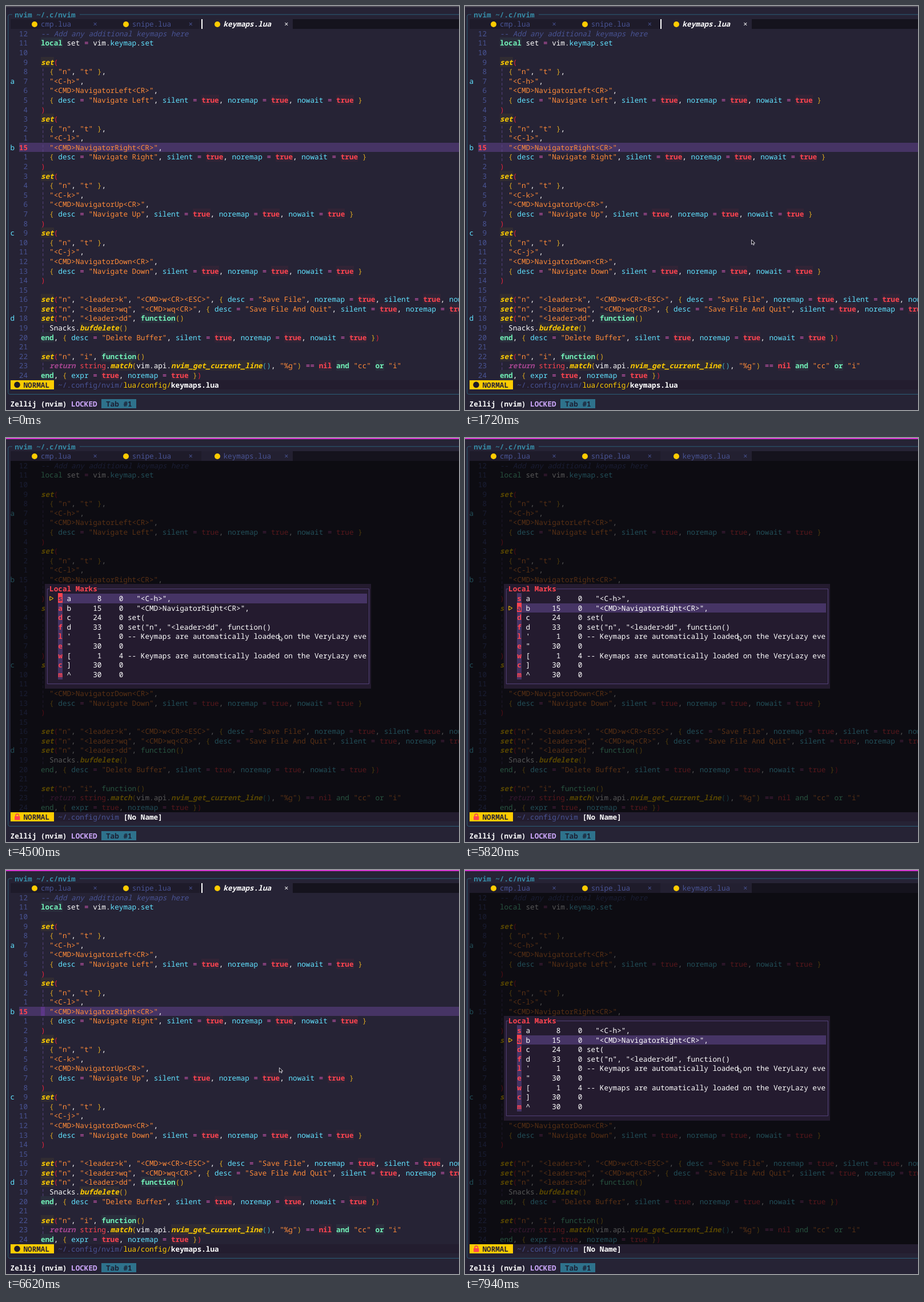
Recreate the animation shown at these times as an HTML page. Size 793 by 706 pixels, loop 8000 ms.

```html
<!DOCTYPE html>
<html lang="en">
<head>
<meta charset="utf-8">
<title>Local marks picker</title>
<style>
html, body { margin: 0; width: 100%; height: 100%; overflow: hidden; background: #262335; }
#stage {
  position: relative; width: 793px; height: 706px; overflow: hidden; background: #262335; color: #fff;
  font: 500 12.683px/16.59px "Noto Sans Mono", "DejaVu Sans Mono", monospace;
  font-variant-ligatures: none; text-rendering: geometricPrecision;
}
#stage div, #stage svg { position: absolute; white-space: pre; }
b { font-weight: 700; }
i { font-style: italic; }
.glow { background: color-mix(in srgb, currentColor 5%, transparent); }
.comment { color: #495495; }
.red { color: #fe4450; }
.green { color: #72f1b8; }
.cyan { color: #61e2ff; }
.orange { color: #ff8b39; }
.yellow { color: #ffcc00; }
.pink { color: #e85fc4; }
.return { color: #a3458f; }
.guide { color: #5b4687; }
.d0 { color: #e0243c; }
.d1 { color: #d9a520; }
.d2 { color: #3fa9b8; }
.open .code b:not(.yellow) { font-weight: 500; }
.open .code .glow { background: none; }
.open .normal, #stage:not(.open) .picker { display: none; }
#stage:not(.focus) .focused { display: none; }
.chosen { background: #463465; }
.label { background: #463465; color: #fe4450; font-weight: 700; }
.chosen .label { background: #fe4450; color: #463465; }
</style>
</head>
<body>
<div id="stage"></div>
<script>
const CW = 7.61, RH = 16.59, TOP = 6.6, LOOP = 8000;
const stage = document.getElementById("stage");
const rowY = r => TOP + r * RH;
const midY = r => rowY(r) + RH / 2;

function put(html, cls, style) {
  const el = document.createElement("div");
  el.className = cls || "";
  el.style.cssText = style;
  el.innerHTML = html;
  stage.append(el);
  return el;
}
const text = (row, col, html, cls) =>
  put(html, cls, `left:${col * CW}px;top:${rowY(row)}px;height:${RH}px`);
const box = (row, col, cols, rows, color, cls) =>
  put("", cls, `left:${col * CW}px;top:${rowY(row)}px;width:${cols * CW}px;height:${rows * RH}px;background:${color}`);
const draw = (shapes, cls) =>
  put(`<svg width="793" height="706" fill="none">${shapes}</svg>`, cls, "left:0;top:0");
const esc = s => s.replace(/&/g, "&amp;").replace(/</g, "&lt;");

const mapping = (key, cmd) => `set(
  { "n", "t" },
  "<C-${key}>",
  "<CMD>Navigator${cmd}<CR>",
  { desc = "Navigate ${cmd}", silent = true, noremap = true, nowait = true }
)
`;
const source = `-- Add any additional keymaps here
local set = vim.keymap.set

` + mapping("h", "Left") + mapping("l", "Right") + mapping("k", "Up") + mapping("j", "Down") + `
set("n", "<leader>k", "<CMD>w<CR><ESC>", { desc = "Save File", noremap = true, silent = true, nowait = true })
set("n", "<leader>wq", "<CMD>wq<CR>", { desc = "Save File And Quit", silent = true, noremap = true, nowait = true })
set("n", "<leader>dd", function()
  Snacks.bufdelete()
end, { desc = "Delete Buffer", silent = true, noremap = true, nowait = true })

set("n", "i", function()
  return string.match(vim.api.nvim_get_current_line(), "%g") == nil and "cc" or "i"
end, { expr = true, noremap = true })`;

const rules = [
  [/^--.*/, "i", "comment"],
  [/^"[^"]*"/, "span", "orange"],
  [/^(local|function|end|and|or)\b/, "b", "green glow"],
  [/^(true|nil)\b/, "b", "red glow"],
  [/^return\b/, "b", "return", "font-style:italic"],
  [/^\w+(?=\()/, "b", "yellow glow", "font-style:italic"],
  [/^string\b/, "span", "red"],
  [/^(keymap|desc|silent|noremap|nowait|expr|set$)/, "span", "cyan"],
  [/^=+/, "span", "pink"],
  [/^\w+/, "span", ""],
];
let depth = 0;

function highlight(line) {
  let out = "", rest = line;
  if (rest.startsWith("  ")) {
    out = '<span class="guide">¦</span> ';
    rest = rest.slice(2);
  }
  while (rest) {
    const rule = rules.find(r => r[0].test(rest));
    let token = rest[0], tag = "span", cls = "", css = "";
    if (rule) {
      token = rest.match(rule[0])[0];
      [, tag, cls, css = ""] = rule;
    } else if ("({".includes(token)) cls = "d" + depth++;
    else if (")}".includes(token)) cls = "d" + --depth;
    out += `<${tag} class="${cls}" style="${css}">${esc(token)}</${tag}>`;
    rest = rest.slice(token.length);
  }
  return out;
}

// Window edge and terminal frame
const edge = put("", "", "left:0;top:0;width:793px;height:2px");
draw(`<path stroke="#2b5f78" d="M11 ${midY(0)}H6.5Q3.8 ${midY(0)} 3.8 ${midY(0) + 3}V${midY(40) - 3}
  Q3.8 ${midY(40)} 6.5 ${midY(40)}H793M129 ${midY(0)}H793"/>`);
text(0, 2, "<b>nvim ~/.c/nvim</b>").style.color = "#368aa5";

// Tab line
box(1, 1, 104, 1, "#15131d");
box(1, 1, 44, 1, "#1e1b2a");
box(1, 45, 21, 1, "#262335", "normal");
box(1, 45, 21, 1, "#232031", "picker");
text(1, 8, "cmp.lua", "comment");
text(1, 20, "×", "comment");
text(1, 29, "snipe.lua", "comment");
text(1, 42, "×", "comment");
text(1, 50, "<b><i>keymaps.lua</i></b>", "normal");
text(1, 64, "×", "normal");
text(1, 50, "keymaps.lua", "comment picker");
text(1, 64, "×", "comment picker");
box(1, 45, .27, 1, "#fff", "normal");
draw([50, 210, 370].map(x => `<circle cx="${x}" cy="${midY(1) + .5}" r="5" fill="#ffcc00"/>`).join(""));

// Buffer
const current = 12, signs = { 5: "a", 12: "b", 21: "c", 30: "d" };
box(2 + current, 3, 102, 1, "#463465", "normal");
box(2 + current, 8, 1, 1, "#5c3687", "focused normal");
source.split("\n").forEach((line, n) => {
  const row = n + 2;
  text(row, 8, highlight(line), "code");
  if (signs[n]) text(row, 1, signs[n], "cyan");
  if (n === current) {
    text(row, 3, "<b>15</b>", "red normal");
    text(row, 3, "15", "comment picker");
  } else text(row, 3, String(Math.abs(n - current)).padStart(2), "comment");
});

// Backdrop
box(2, 1, 104, 37, "rgba(0,0,0,.66)", "picker");

// Status line and session bar
box(39, 1, 104, 1, "#231d2f");
box(39, 1, 10, 1, "#ffcc00");
text(39, 4, "<b>NORMAL</b>").style.color = "#262335";
text(39, 12, '~/.config/nvim/<span class="yellow">lua/config/</span><b style="color:#fff">keymaps.lua</b>', "comment normal");
text(39, 12, '~/.config/nvim <b style="color:#fff">[No Name]</b>', "comment picker");
draw(`<circle cx="19.5" cy="${midY(39)}" r="5.3" fill="#1d1a29"/>`, "normal");
draw(`<rect x="15" y="${midY(39) - 1}" width="9.5" height="6.5" rx="1" fill="#fe4450"/>
  <path d="M17 ${midY(39)}v-2a2.75 2.75 0 0 1 5.5 0v2" stroke="#fe4450" stroke-width="1.6"/>`, "picker");
text(41, 1, '<b>Zellij (nvim) <span style="color:#cfa9ff">LOCKED</span></b>');
box(41, 22, 8, 1, "#2e728c");
text(41, 23, "<b>Tab #1</b>").style.color = "#1c2135";

// Marks picker
const keymapsNote = "-- Keymaps are automatically loaded on the VeryLazy eve";
const marks = [
  ["s", "a", 8, 0, '  "<C-h>",'],
  ["a", "b", 15, 0, '  "<CMD>NavigatorRight<CR>",'],
  ["d", "c", 24, 0, "set("],
  ["f", "d", 33, 0, 'set("n", "<leader>dd", function()'],
  ["l", "'", 1, 0, keymapsNote],
  ["e", '"', 30, 0, ""],
  ["w", "[", 1, 4, keymapsNote],
  ["c", "]", 30, 0, ""],
  ["m", "^", 30, 0, ""],
];
box(15, 9, 75, 11, "#241b2f", "picker");
draw(`<path stroke="#54437c" d="M76 ${midY(15)}H72.3V${midY(25)}H635.5V${midY(15)}H160"/>`, "picker");
text(15, 10, "<b>Local Marks</b>", "red picker");
const items = marks.map(([label, mark, line, col, code], n) => {
  const el = text(16 + n, 12, `<span class="label">${label}</span> ${esc(mark)}` +
    String(line).padStart(7) + String(col).padStart(5) + " " + esc(code), "picker");
  el.style.width = 71 * CW + "px";
  return el;
});
const pointer = draw(`<path stroke="#ffcc00" d="M76.8 ${midY(16) - 3.5}l6 3.5l-6 3.5z"/>`, "picker");

const mouse = draw('<path fill="#15131d" stroke="#e8e6ee" stroke-width=".9" d="M.5 .5v8.2l2-1.8 1.3 2.9 1.5-.7-1.3-2.8h2.6z"/>');

// Mouse path as [time, x, y]
const path = [[1460, 530, 440], [1720, 501, 408], [2250, 501, 408], [2510, 478, 345], [LOOP, 478, 345]];
function mouseAt(t) {
  const k = Math.max(1, path.findIndex(p => p[0] > t));
  const [a, b] = [path[k - 1], path[k]];
  const u = (t - a[0]) / (b[0] - a[0]);
  return [a[1] + (b[1] - a[1]) * u, a[2] + (b[2] - a[2]) * u];
}

function frame(now) {
  const t = now % LOOP;
  const focus = t >= 2650;
  const chosen = t >= 5690 && t < 7410 || t >= 7680 ? 1 : 0;
  stage.classList.toggle("focus", focus);
  stage.classList.toggle("open", t >= 4500 && t < 6350 || t >= 7410);
  edge.style.background = focus ? "#d636d2" : "#4b4855";
  items.forEach((el, n) => el.classList.toggle("chosen", n === chosen));
  pointer.style.top = chosen * RH + "px";
  mouse.style.visibility = t >= 1460 ? "visible" : "hidden";
  const [x, y] = mouseAt(t);
  mouse.style.transform = `translate(${x}px,${y}px)`;
  requestAnimationFrame(frame);
}
frame(performance.now());
</script>
</body>
</html>
```
